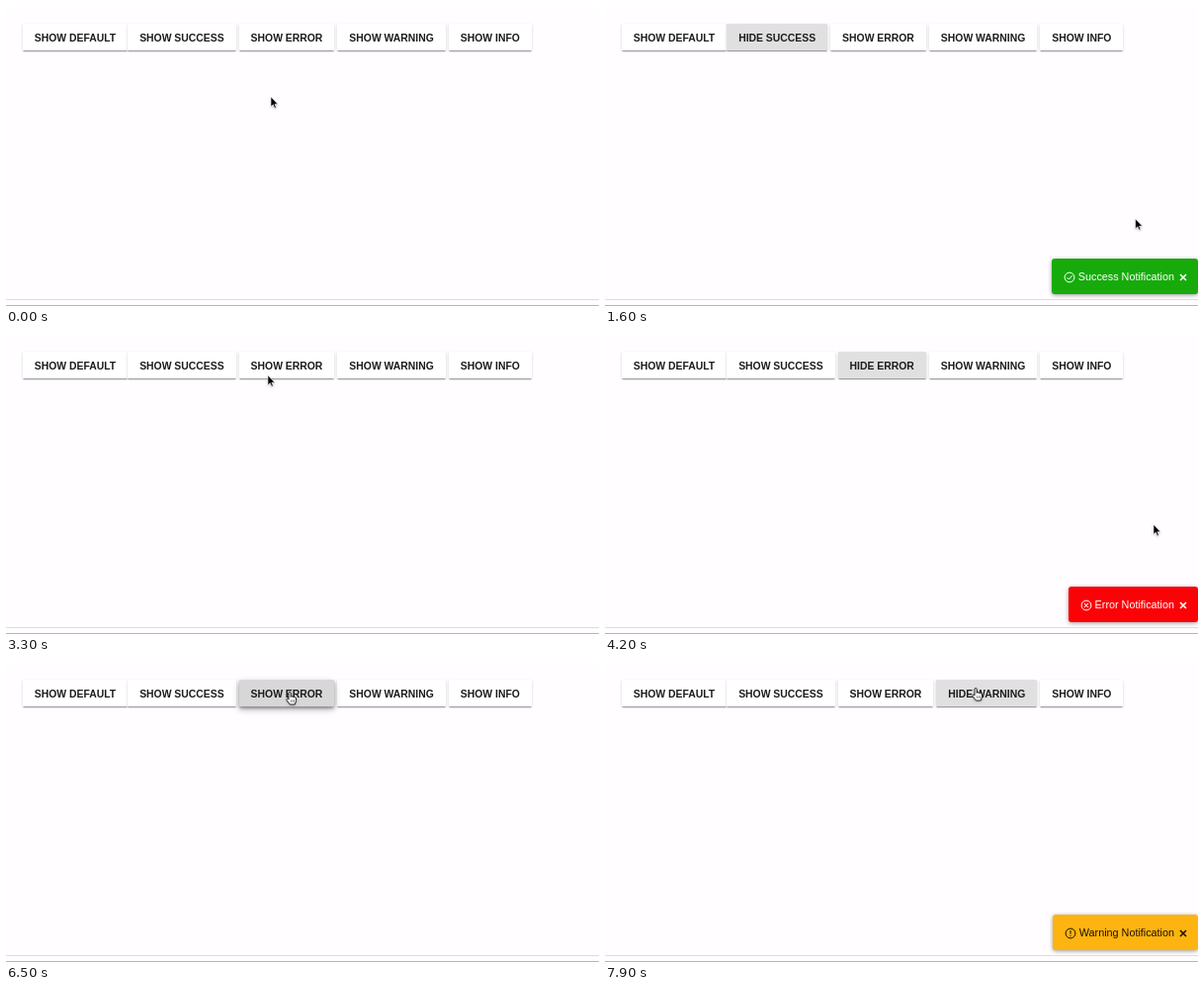
An HTML page for the animation above (8000 ms loop, 600x304 px).

```html
<!DOCTYPE html>
<html lang="en">
<head>
<meta charset="utf-8">
<title>Notification buttons</title>
<style>
  html, body { margin: 0; width: 100%; height: 100%; overflow: hidden; background: #fffdff; }
  #stage {
    position: relative; width: 600px; height: 304px; overflow: hidden;
    font-family: "Liberation Sans", Arial, sans-serif;
  }
  #bar { position: absolute; left: 16.8px; top: 18px; display: flex; gap: 3px; }
  .btn {
    height: 27px; padding: 0 12px; white-space: nowrap;
    font-weight: bold; font-size: 10.4px; line-height: 29px;
    color: #1c1c1c; background: #fff; border-radius: 1px;
    box-shadow: 0 2px 1px -1px rgba(0,0,0,.2), 0 1px 1px rgba(0,0,0,.16), 0 1px 3px rgba(0,0,0,.14);
  }
  .btn:first-child { margin-right: -3px; }
  .btn.grey { background: #e0e0e0; }
  .btn.press {
    background: #d7d7d7; z-index: 1;
    box-shadow: 0 2px 3px rgba(0,0,0,.3), 0 3px 7px rgba(0,0,0,.28);
  }
  .toast {
    position: absolute; top: 256px; right: 0; height: 36px; padding: 0 9px 0 12px;
    display: flex; gap: 3px; align-items: center; color: #fff; border-radius: 3px;
    font-size: 10.8px; white-space: nowrap; box-shadow: 0 1px 4px rgba(0,0,0,.4);
  }
  .toast svg { width: 12px; height: 12px; margin-top: 2px; fill: none; stroke: currentColor; }
  .toast svg:last-child { stroke-width: 1.6; }
  #footer { position: absolute; top: 297px; width: 600px; height: 5px; border: solid #dddbe0; border-width: 1px 0; border-bottom-color: #b4b3b7; }
  .cursor { position: absolute; left: 0; top: 0; width: 14px; height: 16px; overflow: visible; z-index: 2; filter: drop-shadow(0 1px 1px rgba(0,0,0,.22)); }
</style>
</head>
<body>
<div id="stage">
  <div id="footer"></div>
  <div id="bar"></div>
  <svg class="cursor" id="arrow"><path d="M0 0V10L2.3 8L3.8 11.4L5.4 10.7L3.9 7.4H7Z" fill="#000" stroke="#fff" stroke-width=".6"/></svg>
  <svg class="cursor" id="hand"><path d="M3 8V1.6a1.1 1.1 0 0 1 2.2 0V5.4a1 1 0 0 1 2 .3a1 1 0 0 1 1.8 .4a.9 .9 0 0 1 1.5 .7V9.6L9.3 13H4.3L1 8.8a.9 .9 0 0 1 1.4-1.2Z" fill="#fff" stroke="#111" stroke-width=".9" stroke-linejoin="round"/><path d="M5.3 8.3V10.8M7 8.3V10.8M8.6 8.3V10.8" stroke="#333" stroke-width=".6"/></svg>
</div>
<script>
const LOOP = 8000, STEP = 100;
const $ = id => document.getElementById(id);

// Spans are [start, end) in ms; a toast is open while its button says HIDE.
const items = [
  { name: 'Default' },
  { name: 'Success', open: [700, 2500], grey: [400, 2500], press: [700, 1000],
    bg: '#16ab0a', mark: 'M3.6 6.2L5.4 8L8.6 4.3' },
  { name: 'Error', open: [3700, 6400], grey: [3400, 7600], press: [6400, 6700],
    bg: '#fb0207', mark: 'M4 4L8 8M8 4L4 8' },
  { name: 'Warning', open: [7600, LOOP], grey: [7200, LOOP],
    bg: '#fdb410', ink: '#1a1200', mark: 'M6 3V6.8M6 7.9V9.1' },
  { name: 'Info' },
];

// Each pointer move eases from the previous resting place.
const home = { x: 268, y: 92 };
const moves = [
  { from: 100, to: 500, x: 159, y: 25 },
  { from: 900, to: 1300, x: 530, y: 207 },
  { from: 1400, to: 2300, x: 583, y: 276 },
  { from: 2800, to: 3000, x: 262, y: 61 },
  { from: 3100, to: 3400, x: 266, y: 35 },
  { from: 3900, to: 4200, x: 555, y: 193 },
  { from: 4300, to: 5200, x: 580, y: 273 },
  { from: 5300, to: 6100, x: 283, y: 30 },
  { from: 6900, to: 7400, x: 371, y: 26 },
];

const within = (t, span) => !!span && t >= span[0] && t < span[1];
const clamp = v => Math.min(1, Math.max(0, v));
const ease = k => k * k * (3 - 2 * k);

function add(parent, cls, html = '') {
  const el = document.createElement('div');
  el.className = cls;
  el.innerHTML = html;
  return parent.appendChild(el);
}

for (const item of items) {
  item.button = add($('bar'), 'btn');
  if (!item.open) continue;
  item.toast = add($('stage'), 'toast',
    `<svg><circle cx="6" cy="6" r="4.9"/><path d="${item.mark}"/></svg>` +
    `<span>${item.name} Notification</span>` +
    '<svg><path d="M3 3L9 9M9 3L3 9"/></svg>');
  item.toast.style.background = item.bg;
  if (item.ink) item.toast.style.color = item.ink;
}

function pointer(t) {
  let { x, y } = home;
  for (const m of moves) {
    const k = ease(clamp((t - m.from) / (m.to - m.from)));
    x += (m.x - x) * k;
    y += (m.y - y) * k;
  }
  return { x, y };
}

// Half visible for one step at either end.
const fade = (t, span) => (within(t, span) + within(t - STEP, span)) / 2;

function render(t) {
  for (const { name, open, grey, press, button, toast } of items) {
    button.textContent = `${within(t, open) ? 'HIDE' : 'SHOW'} ${name.toUpperCase()}`;
    button.classList.toggle('grey', within(t, grey));
    button.classList.toggle('press', within(t, press));
    if (toast) toast.style.opacity = fade(t, open);
  }
  const { x, y } = pointer(t);
  const clickable = y < 40 || (x > 570 && y > 262);
  $('arrow').style.display = clickable ? 'none' : 'block';
  $('hand').style.display = clickable ? 'block' : 'none';
  $('arrow').style.transform = $('hand').style.transform = `translate(${x}px, ${y}px)`;
}

const start = performance.now();
let last = -1;
function tick() {
  const t = Math.floor(((performance.now() - start) % LOOP) / STEP) * STEP;
  if (t !== last) render(last = t);
  requestAnimationFrame(tick);
}
tick();
</script>
</body>
</html>
```
